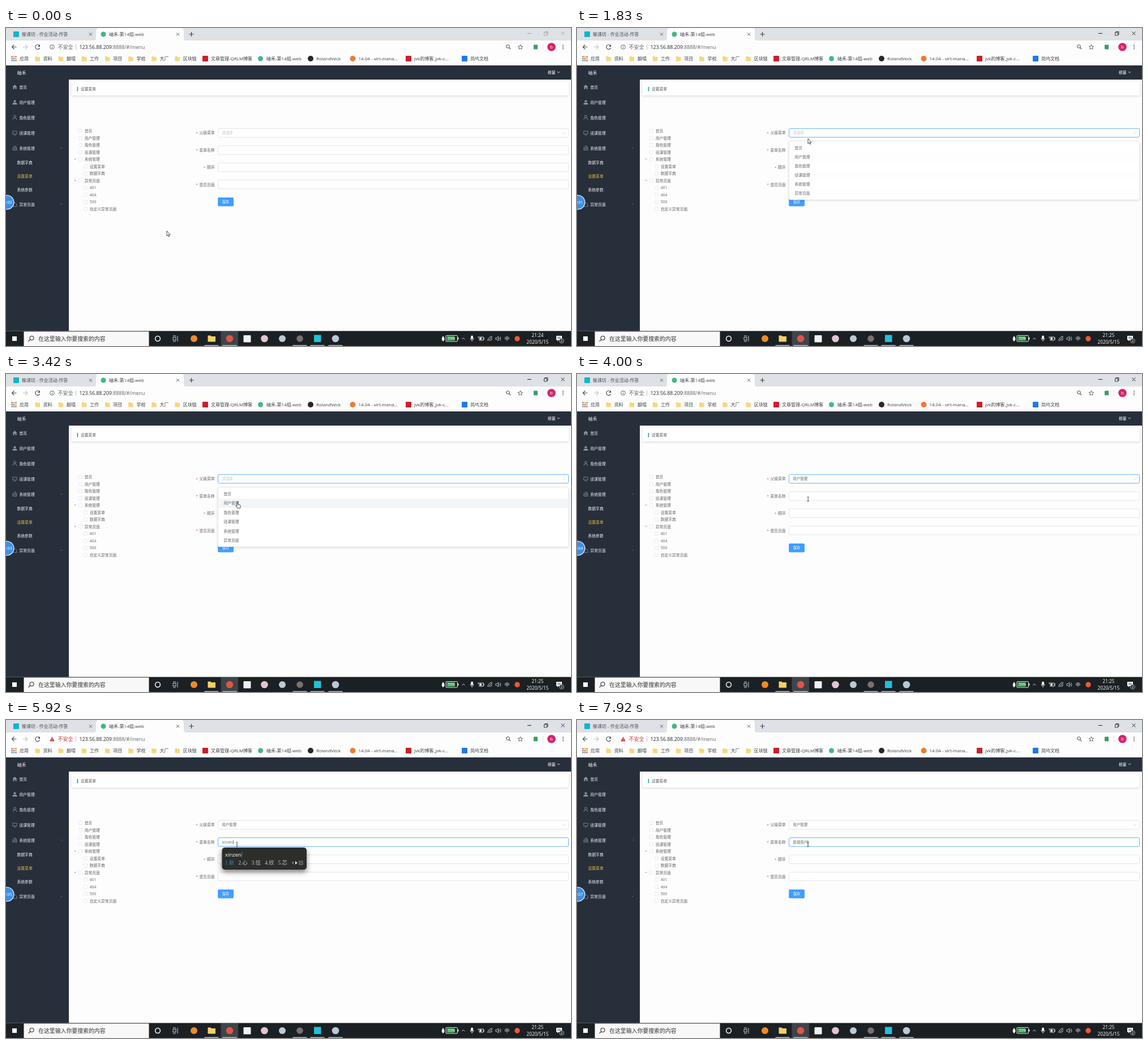
An HTML page for the animation above (8 s loop, 998 by 561 pixels).

```html
<!DOCTYPE html>
<html lang="zh-CN">
<head>
<meta charset="utf-8">
<title>设置菜单</title>
<style>
html, body { margin: 0; width: 100%; height: 100%; overflow: hidden; background: #fdfdfd; }
svg { display: block; width: 100vw; height: 100vh; font-family: "Open Sans", "Noto Sans CJK SC", "Noto Sans CJK", sans-serif; }
.card { filter: drop-shadow(0 1px 2px rgba(0, 0, 0, .16)); }
.ime { filter: drop-shadow(0 4px 5px rgba(0, 0, 0, .5)); }
.candidates { font-family: "Liberation Serif", "Noto Sans CJK SC", "Noto Sans CJK", serif; font-weight: 300; }
</style>
</head>
<body>
<svg viewBox="0 0 998 561"></svg>
<script>
const LOOP = 8000;
const svg = document.querySelector('svg');
let layer = svg;

function el(tag, attrs, content) {
  const node = document.createElementNS('http://www.w3.org/2000/svg', tag);
  set(node, attrs);
  if (content !== undefined) node.textContent = content;
  return layer.appendChild(node);
}
function set(node, attrs) {
  for (const key in attrs) node.setAttribute(key, attrs[key]);
}
function group(draw, attrs = {}) {
  const outer = layer;
  const node = el('g', attrs);
  layer = node;
  draw();
  layer = outer;
  return node;
}
const show = (node, on) => set(node, { visibility: on ? 'visible' : 'hidden' });
const rect = (x, y, width, height, fill, more) => el('rect', { x, y, width, height, fill, ...more });
const dot = (cx, cy, r, fill, more) => el('circle', { cx, cy, r, fill, ...more });
const line = (d, stroke, width = 1, more) => el('path', { d, stroke, 'stroke-width': width, fill: 'none', ...more });
const shape = (d, fill, more) => el('path', { d, fill, ...more });
const label = (x, middle, string, size, fill, more) =>
  el('text', { x, y: middle + size * .37, 'font-size': size, fill, ...more }, string);
const END = { 'text-anchor': 'end' };
const MID = { 'text-anchor': 'middle' };
const chevron = (x, y, r, up, color) => line(`M${x - r} ${y + (up ? r : -r) / 2}l${r} ${up ? -r : r}l${r} ${up ? r : -r}`, color, .8);
const cross = (x, y, r, color) => line(`M${x - r} ${y - r}l${2 * r} ${2 * r}m0 ${-2 * r}l${-2 * r} ${2 * r}`, color);
function lens(x, y, r, color) {
  dot(x + 1, y - 1, r, 'none', { stroke: color, 'stroke-width': 1.1 });
  line(`M${x + 1 - r * .7} ${y - 1 + r * .7}l${-r} ${r}`, color, 1.2);
}

// Browser tabs
rect(0, 0, 998, 22, '#dee1e6');
shape('M155 22q4 0 4-4V5q0-5 5-5h145q5 0 5 5v13q0 4 4 4z', '#fdfdfd');
rect(13, 6, 10, 10, '#12b5cb', { rx: 1 });
label(28, 11, '榆课坊 - 作业活动-作答', 8, '#4a4d51');
dot(172, 11, 4.5, '#41b883');
label(182, 11, '岫禾-第14组-web', 8, '#3c4043');
for (const x of [149.5, 303.5]) cross(x, 11, 2.5, '#55585c');
line('M323.5 11h8m-4-4v8', '#3c4043', 1.2);
const controls = group(() => {
  line('M921 9.500h7', 'currentColor');
  line('M950.5 8h5v5h-5zm1.500 0v-1.500h5v5h-1.500', 'currentColor', .9);
  cross(983.5, 9.500, 3, 'currentColor');
});

// Toolbar
rect(0, 22, 998, 44, '#fdfdfd');
line('M18.500 33.500h-8m4-4l-4 4l4 4', '#4d5054', 1.200);
line('M30 33.500h8m-4-4l4 4l-4 4', '#c4c6c9', 1.200);
line('M59 31a4 4 0 1 0 .6 4', '#4d5054', 1.200);
shape('M60 29v4h-4z', '#4d5054');
const plainNotice = group(() => {
  dot(81.5, 33.5, 3.8, 'none', { stroke: '#5f6368' });
  line('M81.500 33v2.600m0-4.500v1', '#5f6368');
  label(91.5, 33.5, '不安全', 9, '#5f6368');
});
const redNotice = group(() => {
  shape('M81.500 29.500l4.300 8h-8.600z', '#c93a31');
  line('M81.500 32.300v2.300m0 .8v1', '#fff', .8);
  label(91.5, 33.5, '不安全', 9, '#c93a31');
});
line('M123.500 28.500v10', '#b5b7ba', .8);
label(129.5, 33.5, '123.56.88.209', 8.8, '#27292c').insertAdjacentHTML('beforeend', '<tspan fill="#5f6368">:8888/#/menu</tspan>');
group(() => lens(0, 0, 2.8, '#55585c'), { transform: 'translate(887.5 33.500) scale(-1 1)' });
shape('M908.500 29.300l1.200 2.900 3.100.2-2.400 2 .8 3-2.700-1.700-2.700 1.700.8-3-2.400-2 3.100-.2z', 'none', { stroke: '#55585c', 'stroke-width': .9 });
rect(932, 29.5, 7, 8, '#3d9a66', { rx: 1 });
line('M948.500 28v11', '#d5d7da', .8);
dot(963.5, 33.5, 7.3, '#d6246c');
label(963.5, 33.3, 'b', 8, '#fff', MID);
for (let i = -1; i < 2; i++) dot(984, 33.5 + i * 3, .9, '#55585c');

// Bookmarks
for (let i = 0; i < 9; i++)
  rect(9.5 + i % 3 * 3.4, 49.5 + Math.floor(i / 3) * 3.4, 2.3, 2.3, ['#dc4f40', '#e0aa2d', '#459b61', '#4b84db'][i % 4]);
const bookmark = (x, name) => label(x, 54.2, name, 8, '#3c4043');
bookmark(24, '应用');
['资料', '翻墙', '工作', '项目', '学校', '大厂', '区块链'].forEach((name, i) => {
  const x = 51.5 + i * 41.15;
  shape(`M${x} 50h3.500l1 1h4v7.500h-8.500z`, '#f6d77d');
  bookmark(x + 14.3, name);
});
const square = (x, color) => rect(x, 49, 10, 10, color, { rx: 1 });
square(347, '#c8212d'); bookmark(362, '文章管理-QRLM博客');
dot(449.5, 54, 4.5, '#41b883'); bookmark(460, '岫禾-第14组-web');
dot(538, 54, 5, '#24292e'); bookmark(548, 'RolandVeck');
dot(612.5, 54, 5, '#ee7b31'); bookmark(622.5, '14.04 - virt-mana...');
square(706, '#c8212d'); bookmark(721, 'jvk的博客_jvk-c...');
square(805, '#1d7be0'); bookmark(820, '岚屿文档');

// Page header and side menu
rect(0, 66, 998, 25, '#272f3a');
label(19.5, 79, '岫禾', 8, '#eceef0');
label(957, 78, '穆蔓', 6.8, '#fff');
chevron(976, 78, 2.2, false, '#fff');
rect(0, 91, 111, 443.5, '#272f3b');
const menu = (x, y, name, color = '#f5f6f7') => label(x, y, name, 6.8, color, { 'font-weight': 500 });
['首页', '用户管理', '角色管理', '班课管理', '系统管理'].forEach((name, i) => menu(23.5, 104 + i * 27.05, name));
['数据字典', '设置菜单', '系统参数'].forEach((name, i) => menu(19.5, 237.5 + i * 24.2, name, i === 1 ? '#e6bc48' : undefined));
menu(23.5, 311.5, '异常页面');
const GREY = '#8f959d';
shape('M11.500 104l4-4 4 4h-1v4h-2v-3h-2v3h-2v-4z', GREY);
dot(15.5, 129.3, 2, GREY);
shape('M11.500 135v-1q0-2.200 4-2.200t4 2.200v1z', GREY);
dot(15.5, 156, 2, 'none', { stroke: GREY, 'stroke-width': .8 });
line('M12 162q0-3.500 3.500-3.500t3.500 3.500', GREY, .8);
line('M11.800 182h7.400v5h-7.400zm2 7h3.600', GREY, .8);
line('M12 211h7v4.500h-7zm1.500-2.500h4v2m-5 2.500h6', GREY, .8);
line('M12.500 308.500h4l2.500 2.500v4h-6.500z', GREY, .8);
chevron(98, 212, 1.8, true, '#6d6a50');
chevron(98, 311, 1.8, false, '#6d6a50');

dot(1.5, 307.5, 12.4, '#3f8fe2', { stroke: '#d5e6f8', 'stroke-width': 1.4 });
const counter = label(10.5, 307.5, '', 7, '#fff', END);

// Content
group(() => rect(115.5, 94, 878.5, 25, '#fff', { rx: 1 }), { class: 'card' });
rect(125.5, 104, 1.7, 7.5, '#22b07d');
label(132, 108, '设置菜单', 6.75, '#505357');

['首页', '用户管理', '角色管理', '班课管理', '-系统管理', '设置菜单', '数据字典', '-异常页面', '401', '404', '500', '自定义异常页面']
  .forEach((entry, i) => {
    const y = 181.5 + i * 12.53;
    const child = i > 4 && i !== 7;
    const x = child ? 137 : 128;
    if (entry[0] === '-') shape(`M120 ${y - 1.2}h4.200l-2.100 2.500z`, '#b9bdc5');
    rect(x + .3, y - 3, 6, 6, '#fff', { rx: 1, stroke: '#dcdfe6', 'stroke-width': .7 });
    label(x + 10.7, y, entry.replace('-', ''), 6.8, '#606266');
  });

const fieldY = i => 185 + i * 30.35;
const fields = ['父级菜单', '菜单名称', '顺序', '是否页面'].map((name, i) => {
  const y = fieldY(i);
  label(368.5, y, name, 6.75, '#606266', END);
  label(368.5 - 6.75 * name.length - 2.5, y + .5, '*', 6.75, '#f56c6c', END);
  return rect(374.5, y - 7.7, 619, 15.4, '#fff', { rx: 2, 'stroke-width': .8 });
});
const parentText = label(381.5, 184.8, '', 6.4, '#606266');
const arrowDown = group(() => chevron(985.5, 185.2, 2.2, false, '#c0c4cc'));
const arrowUp = group(() => chevron(985.5, 185.2, 2.2, true, '#c0c4cc'));
const nameText = label(381.5, fieldY(1), '', 6.4, '#606266');
const caret = rect(0, 211.8, .7, 7, '#333');
rect(374.2, 299, 27.8, 15.4, '#409eff', { rx: 1.6 });
label(388, 306.7, '保存', 6.3, '#fff', { ...MID, 'font-weight': 500 });

let hoverRow;
const dropdown = group(() => {
  group(() => rect(374.5, 200, 619, 104.8, '#fff', { rx: 2, stroke: '#e4e7ed', 'stroke-width': .6 }), { class: 'card' });
  hoverRow = rect(374.8, 0, 618.4, 16.4, '#f2f6f9');
  ['首页', '用户管理', '角色管理', '班课管理', '系统管理', '异常页面']
    .forEach((name, i) => label(384.5, 211.6 + i * 16.4, name, 6.75, '#606266'));
});
const ime = group(() => {}, { class: 'ime' });

// Taskbar
rect(0, 534.5, 998, 26.5, '#1b2024');
rect(11, 544, 8, 8, '#fff');
rect(31.5, 535.5, 221, 25.5, '#f8f8f8');
lens(44.5, 548, 3.5, '#303030');
label(57, 548, '在这里输入你要搜索的内容', 9.9, '#333');
dot(268, 548, 4.4, 'none', { stroke: '#fff', 'stroke-width': 1.5 });
line('M295 545.500h5v5h-5zm0-2.500h5m-5 10h5m3-10v10', '#e4e5e6', .9);
rect(379.5, 535, 30.5, 26, '#3f4448');
dot(332, 548, 6, '#f08a28');
shape('M356.500 542.500h5l1 1.500h7.500v9.500h-13.500z', '#f5cf63');
dot(395, 548, 6.3, '#de5548');
rect(419.5, 542, 13, 12.5, '#f0f0f0', { rx: 1 });
dot(456.5, 548, 6.3, '#e3c4d0');
dot(488, 548, 6, '#bdc9d6');
dot(519, 548, 5.8, '#79706f');
rect(544, 541.5, 12.5, 12.5, '#20c2d8');
dot(582, 548, 6.3, '#b9c8d6');
for (const x of [363, 395, 519, 550, 582]) rect(x - 12.5, 559.3, 25, 1.7, '#76b9ed');
shape('M772 543q5 6 0 10q-4.500-4 0-10z', '#f0f0f0');
rect(777, 542.5, 20.5, 10.5, '#22262a', { stroke: '#e8e8e8', 'stroke-width': 1, rx: 1 });
rect(778.5, 544, 14, 7.5, '#35a853');
rect(798, 546, 1.5, 3.5, '#e8e8e8');
label(787, 547.8, '59%', 6.5, '#fff', MID);
chevron(808, 548, 2.6, true, '#fff');
rect(821.3, 542.5, 3.6, 6.5, '#fff', { rx: 1.8 });
line('M820 547q0 3.500 3.100 3.500t3.100-3.500m-3.100 3.500v2.500', '#fff', .8);
line('M836 545h7v6h-7zm7 1.500h1.300v3h-1.300m-8.800-5.500v3', '#e8e8e8', .9);
shape('M837 546h3v4h-3z', '#e8e8e8');
line('M851 552a8 8 0 0 1 8-8m-5.500 8a5.500 5.500 0 0 1 5.500-5.500m-3 5.500a3 3 0 0 1 3-3', '#e8e8e8', .9);
line('M865 546.500h2l2.500-2.500v8l-2.500-2.500h-2zm6 0q1.300 1.500 0 3m1.600-5q2.800 3.500 0 7', '#e8e8e8', .8);
label(885, 548, '中', 8.5, '#fff', MID);
dot(903, 548, 4.7, '#ec5a36');
const clock = label(939, 542, '', 8.2, '#fff', MID);
label(939, 554, '2020/5/15', 8.2, '#fff', MID);
shape('M972 543h10v7.500h-6l-2 2v-2h-2z', '#fff');
line('M974 545.500h6m-6 2h6', '#1b2024', .7);
dot(981.5, 552, 4, '#2b3034', { stroke: '#c8c8c8', 'stroke-width': .7 });
label(981.5, 552, '2', 6, '#fff', MID);

// Pointers, each with its hot spot at the origin
const pointers = {
  arrow: group(() => shape('M0 0v9l2.100-1.900 1.400 3.100 1.300-.6-1.400-3h2.800z', '#fff', { stroke: '#222', 'stroke-width': .8 })),
  hand: group(() => shape('M-1 1q0-1 .9-1t.9 1v3.200l3.300.7q1.300.4 1.300 1.600l-.7 4.300h-5l-2.700-3.800q-.5-1.200.9-1l1.100 1z', '#fff', { stroke: '#222', 'stroke-width': .8 })),
  beam: group(() => line('M-1.700-4q1.700 0 1.700.7v6.600q0 .7-1.700.7m3.400-8q-1.700 0-1.700.7m0 6.600q0 .7 1.700.7', '#222', .8))
};
const pointerPath = [
  [80, 284, 358], [420, 330, 297], [700, 388, 218], [1000, 396, 207], [1400, 401, 187],
  [1680, 402, 188], [1833, 408, 195], [2160, 408.5, 224], [2600, 409, 226], [3660, 409, 226], [4080, 408, 219.5]
];
function pointerAt(t) {
  const next = pointerPath.findIndex(p => p[0] > t);
  if (next === 0) return pointerPath[0].slice(1);
  if (next < 0) return pointerPath.at(-1).slice(1);
  const [a, b] = [pointerPath[next - 1], pointerPath[next]];
  const k = (t - a[0]) / (b[0] - a[0]);
  return [a[1] + (b[1] - a[1]) * k, a[2] + (b[2] - a[2]) * k];
}

// Typing with a pinyin input method
const entries = [
  { word: 'xinzeng', from: 5330, gap: 110, commit: 6410, result: '新增', left: 381.5,
    choices: { 1: '下 小 想 写 新', 2: '系 西 洗 喜 戏', 3: '新 心 信 欣 芯', 7: '新增 新 心 信 欣' } },
  { word: 'yonghu', from: 6660, gap: 175, commit: 7830, result: '用户', left: 397.5,
    choices: { 1: '与 页 有 月 用', 3: '用 永 勇 拥 涌', 5: '用户 拥护 用 永 勇' } }
];
function typing(t) {
  let done = '', lastKey = 4410;
  for (const entry of entries) {
    if (t < entry.from) break;
    if (t >= entry.commit) {
      done += entry.result;
      lastKey = entry.commit;
      continue;
    }
    const count = Math.min(entry.word.length, 1 + Math.floor((t - entry.from) / entry.gap));
    return { done, lastKey: t, entry, pinyin: entry.word.slice(0, count) };
  }
  return { done, lastKey, pinyin: '' };
}

function drawIme({ entry, pinyin }) {
  ime.replaceChildren();
  if (!pinyin) return;
  const { left, choices } = entry;
  const key = Object.keys(choices).filter(n => n <= pinyin.length).pop();
  layer = ime;
  const box = rect(left, 225, 0, 39, '#2d2d2b', { rx: 5 });
  const typed = label(left + 5.5, 237, pinyin, 9.5, '#fff');
  rect(left + 6.2 + typed.getComputedTextLength(), 232, .8, 10, '#2a9bd0');
  let x = left + 5.5;
  choices[key].split(' ').forEach((word, i) => {
    label(x, 252, `${i + 1}.${word}`, 9.3, i ? '#c6c6c4' : '#2389b5', { class: 'candidates' });
    x += 14.3 + 9.1 * word.length;
  });
  shape(`M${x + 4} 249v6l-3.500-3z`, '#777');
  shape(`M${x + 7} 249v6l3.500-3z`, '#fff');
  rect(x + 14, 249, 6, 6, 'none', { stroke: '#bbb', 'stroke-width': .7 });
  shape(`M${x + 15.5} 251.300h3l-1.500 1.800z`, '#bbb');
  set(box, { width: x + 27 - left });
  layer = svg;
}

const OPEN = 1667, CHOOSE = 3500, FOCUS = 4410;
const progress = (t, from) => Math.max(0, Math.min(1, (t - from) / 300));
const easeOut = p => 1 - (1 - p) ** 5;

function render(t) {
  const isOpen = t >= OPEN - 1 && t < CHOOSE;
  const scale = t < CHOOSE ? easeOut(progress(t, OPEN)) : 1 - easeOut(progress(t, CHOOSE));
  const [x, y] = pointerAt(t);

  controls.style.color = t < 330 ? '#a2a4a7' : '#222';
  clock.textContent = t < 500 ? '21:24' : '21:25';
  counter.textContent = '00:0' + Math.floor((t + 5) / 1000);
  show(plainNotice, t < 5330);
  show(redNotice, t >= 5330);

  const focused = t >= FOCUS ? 1 : t >= OPEN - 1 ? 0 : -1;
  fields.forEach((field, i) => set(field, { stroke: i === focused ? '#409eff' : '#dcdfe6' }));
  parentText.textContent = t < CHOOSE ? '请选择' : '用户管理';
  set(parentText, { fill: t < CHOOSE ? '#c0c4cc' : '#606266' });
  show(arrowUp, isOpen);
  show(arrowDown, !isOpen);

  set(dropdown, { transform: `translate(0 ${200 * (1 - scale)}) scale(1 ${scale})`, opacity: scale });
  show(dropdown, scale > 0);
  const row = Math.floor((y - 203.4) / 16.4);
  set(hoverRow, { y: 203.4 + row * 16.4, opacity: row >= 0 && t > OPEN ? 1 : 0 });

  const input = typing(t);
  nameText.textContent = input.done + input.pinyin;
  set(caret, { x: 382 + (nameText.textContent ? nameText.getComputedTextLength() : 0) });
  show(caret, t >= FOCUS && (t - input.lastKey) % 1060 < 530);
  drawIme(input);

  const kind = t >= 3830 ? 'beam' : t >= 2060 || (t >= 1330 && t < 1750) ? 'hand' : 'arrow';
  for (const name in pointers) show(pointers[name], name === kind);
  set(pointers[kind], { transform: `translate(${x} ${y})` });
}

// Twelve pictures a second, with every sixth one held
const start = performance.now();
let lastStep = -1;
function tick() {
  let step = Math.floor(((performance.now() - start) % LOOP + 4) * .012) % 96;
  if (step % 6 === 3) step--;
  if (step !== lastStep) render(step * 1000 / 12);
  lastStep = step;
  requestAnimationFrame(tick);
}
tick();
</script>
</body>
</html>
```
